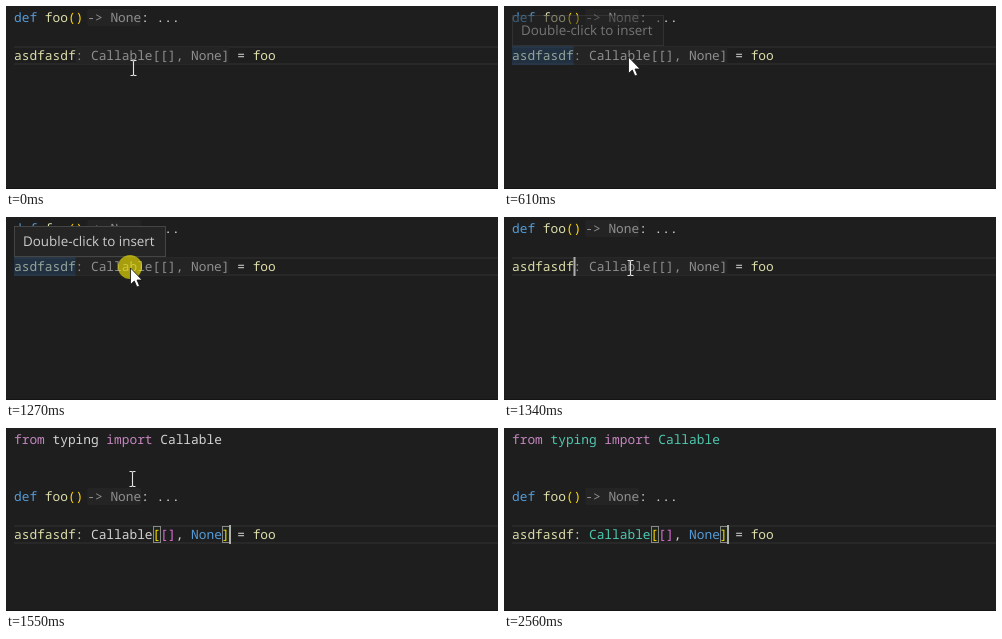
Recreate the animation shown at these times as an HTML page. Size 492x183 px, loop 2.69 s.

```html
<!DOCTYPE html>
<html lang="en">
<head>
<meta charset="utf-8">
<title>Inlay hint insertion</title>
<style>
  html, body { margin: 0; width: 100%; height: 100%; overflow: hidden; background: #1e1e1e; }
  svg { display: block; width: 492px; height: 183px; }
  text { font: 12.83px "Noto Sans Mono", monospace; white-space: pre; text-rendering: geometricPrecision; }
  .tip { font: 13.4px "Open Sans", sans-serif; }
</style>
</head>
<body>
<svg id="stage" viewBox="0 0 492 183"></svg>
<script>
const LOOP = 2690, LEFT = 8, CHAR = 7.698, LINE = 19;
const plain = '#d4d4d4', keyword = '#569cd6', control = '#c586c0', type = '#4ec9b0';
const func = '#dcdcaa', gold = '#ffd700', orchid = '#da70d6', hint = '#8f8f8f';

const rowTop = row => 2 + row * LINE;
const columnX = column => LEFT + column * CHAR;

const rect = (x, y, w, h, attrs) =>
  `<rect x="${x}" y="${y}" width="${w}" height="${h}" ${attrs}/>`;

// Parts are [text, colour] pairs laid on the character grid.
function code(row, parts, x = LEFT) {
  return parts.map(([text, color]) => {
    const span = `<text x="${x}" y="${rowTop(row) + 14}" fill="${color}">${text.replace('>', '&gt;')}</text>`;
    x += text.length * CHAR;
    return span;
  }).join('');
}

const currentLine = row =>
  rect(LEFT, rowTop(row), 484, 2, 'fill="#282828"') +
  rect(LEFT, rowTop(row) + 17, 484, 2, 'fill="#282828"');

const hintBox = (row, x, chars) =>
  rect(x, rowTop(row) + 1, chars * CHAR, 17, 'rx="2" fill="#242424"');

const definition = row =>
  hintBox(row, 81.3, 7) +
  code(row, [['def ', keyword], ['foo', func], ['()', gold]]) +
  code(row, [['-> None', hint], [': ...', plain]], 81.3);

const bracketBox = column =>
  rect(Math.round(columnX(column)) + .5, rowTop(5) + 1.5, 7, 16,
    'fill="#006400" fill-opacity=".1" stroke="#888"');

const before = definition(0) + currentLine(2) + hintBox(2, columnX(8), 20) +
  code(2, [['asdfasdf', func], [': Callable[[], None]', hint], [' = ', plain], ['foo', func]]);

const after = resolved => {
  const name = resolved ? type : plain;
  return code(0, [['from ', control], ['typing', name], [' import ', control], ['Callable', name]]) +
    definition(3) + currentLine(5) + bracketBox(18) + bracketBox(27) +
    code(5, [['asdfasdf', func], [': ', plain], ['Callable', name], ['[', gold], ['[]', orchid],
      [', ', plain], ['None', keyword], [']', gold], [' = ', plain], ['foo', func]]);
};

const caret = (x, row) => rect(x, rowTop(row), 2, LINE, 'fill="#aeafad"');

const hoverRange = rect(LEFT, rowTop(2), 8 * CHAR, LINE, 'fill="#264f78" fill-opacity=".4"');
const tooltip = opacity => `<g opacity="${opacity}">` +
  rect(8.5, 9.5, 151, 30, 'fill="#252526" stroke="#454545"') +
  '<text class="tip" x="17" y="29" fill="#ccc">Double-click to insert</text></g>';

const click = '<circle cx="124" cy="50" r="12" fill="#fff000" fill-opacity=".6"/>';

const pointers = {
  arrow: '<path d="M0 0V16.5L3.8 13L6.4 19L9 17.9L6.5 12H11.6Z" fill="#fff" stroke="#111" stroke-width=".8"/>',
  beam: '<path d="M-3 -7.5H-1L0 -6.8L1 -7.5H3M0 -7V7M-3 7.5H-1L0 6.8L1 7.5H3" fill="none" stroke="#e4e4e4" stroke-width="1.1"/>'
};

const mouse = [
  [0, 'beam', 127.5, 62], [70, 'beam', 127.5, 61], [140, 'beam', 127, 59],
  [210, 'arrow', 124.5, 52.5], [280, 'arrow', 124.5, 51], [1340, 'beam', 126.5, 51],
  [2150, 'beam', 139.5, 58], [2220, 'beam', 250.5, 94], [2290, 'beam', 447.5, 152], [2360]
];

function pointer(t) {
  const [, shape, x, y] = mouse.findLast(sample => sample[0] <= t);
  return shape ? `<g transform="translate(${x} ${y})">${pointers[shape]}</g>` : '';
}

function scene(t) {
  const within = (from, to) => t >= from && t < to;
  let out = t < 1550 ? before : after(t >= 2010);
  if (within(610, 1340)) out += hoverRange + tooltip(t < 740 ? .5 : 1);
  if (within(1340, 1550)) out += caret(69.5, 2);
  if (within(1550, 2010) || t >= 2560) out += caret(223, 5);
  if (within(1270, 1340) || within(1410, 1480)) out += click;
  return out + rect(0, 182, 492, 1, 'fill="#141414"') + pointer(t);
}

const stage = document.getElementById('stage');
const start = performance.now();
let shown = '';

function draw() {
  const next = scene((performance.now() - start) % LOOP);
  if (next !== shown) stage.innerHTML = shown = next;
  requestAnimationFrame(draw);
}
draw();
</script>
</body>
</html>
```
